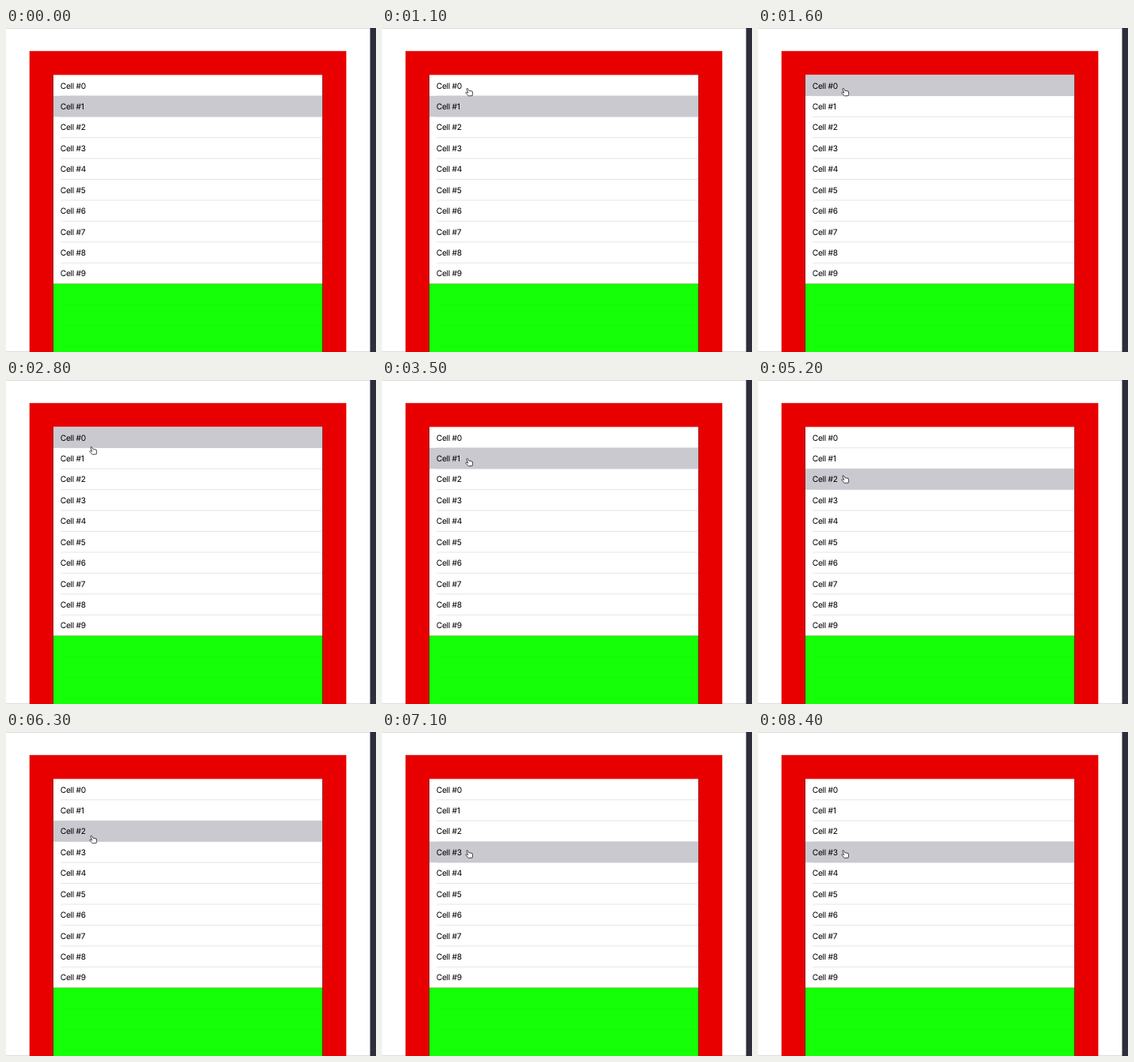
Animation of 468x410 px, one loop 9000 ms. Source, as an HTML page:

```html
<!DOCTYPE html>
<html lang="en">
<head>
<meta charset="utf-8">
<style>
  html, body { margin: 0; width: 100%; height: 100%; overflow: hidden; background: #fff; }
  svg { display: block; }
  text { font: 10.2px Inter, Roboto, sans-serif; letter-spacing: -.25px; text-rendering: geometricPrecision; }
</style>
</head>
<body>
<svg width="468" height="410">
  <path d="M0 .5H461M0 409.5H461" stroke="#dcdcdc"/>
  <rect x="460.5" width="8" height="410" fill="#2d2e39"/>
  <rect x="29.7" y="29.2" width="400.7" height="381" fill="#e80000"/>
  <rect x="59.8" y="59.4" width="340.5" height="264.3" fill="#fff"/>
  <rect x="59.8" y="323.7" width="340.5" height="87" fill="#14ff08"/>
  <g id="lines" stroke="#000" stroke-width=".8"></g>
  <rect id="highlight" x="59.8" width="340.5" height="26.6" fill="#cac9d0"/>
  <path d="M59.5 59.4V410M400.5 59.4V410" stroke="#500" stroke-opacity=".6"/>
  <g id="labels"></g>
  <path id="hand" fill="#fff" stroke="#333" stroke-width=".9" stroke-linejoin="round"
    d="M-1.7 0L-3.2-3.4Q-3.2-5-2-4.7L-.3-1.8L4-1L4.6 2.5L4 4.6L-.8 5L-4.3 1.2Q-4.3 0-3 .2L-1.4 1.3Z"/>
</svg>
<script>
const LOOP = 9000, STEP = 100, TOP = 59.4, ROW = 26.43;
const cursorStops = [326, 81, 104, 125.5, 154.5];
const $ = id => document.getElementById(id);

function add(parent, tag, attrs, text = '') {
  const el = document.createElementNS('http://www.w3.org/2000/svg', tag);
  for (const key in attrs) el.setAttribute(key, attrs[key]);
  el.textContent = text;
  $(parent).append(el);
}

// Separators continue faintly over the empty part of the table.
for (let i = 0; i < 14; i++) {
  const y = TOP + i * ROW;
  if (i < 10) add('labels', 'text', { x: 68.7, y: y + 17.1 }, `Cell #${i}`);
  if (i) add('lines', 'path', { d: `M69 ${y}H400.3`, opacity: i < 10 ? .13 : .03 });
}

const clickTime = row => 1600 + 1800 * row + 100 * (row % 2);
const moveStart = row => row ? Math.ceil(9 + 17.5 * row) * 100 : 400;

function moveProgress(row, t) {
  const p = (t - moveStart(row)) / (row ? 500 : 700);
  return 1 - (1 - Math.max(0, Math.min(1, p))) ** 2;
}

function draw(now) {
  const t = Math.floor(now % LOOP / STEP) * STEP;
  let selected = 1;
  let y = cursorStops[0];
  for (let row = 0; row < 4; row++) {
    if (t >= clickTime(row)) selected = row;
    y += (cursorStops[row + 1] - cursorStops[row]) * moveProgress(row, t);
  }
  const x = 77 + 33.2 * moveProgress(0, t);

  $('highlight').setAttribute('y', TOP + selected * ROW);
  $('hand').setAttribute('transform', `translate(${x} ${y})`);
  $('hand').style.display = t < moveStart(0) ? 'none' : '';
}

const origin = performance.now();
function frame() {
  draw(performance.now() - origin);
  requestAnimationFrame(frame);
}
frame();
</script>
</body>
</html>
```
